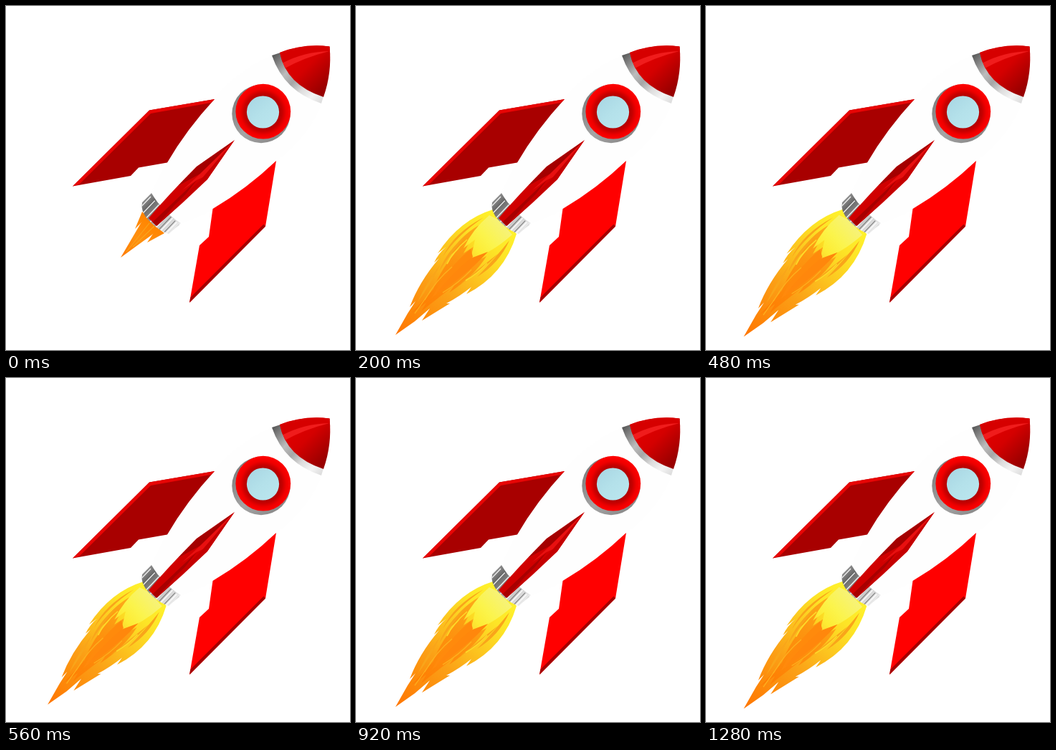
Write an HTML page with a canvas that moves like this. It is 480 px wide and 480 px high and loops after 1320 ms.

```html
<!DOCTYPE html>
<html lang="en">
<head>
<meta charset="utf-8">
<title>Rocket</title>
<style>
html, body { margin: 0; width: 100%; height: 100%; overflow: hidden; background: #fff; }
canvas { display: block; width: 480px; height: 480px; }
</style>
</head>
<body>
<canvas id="stage" width="480" height="480"></canvas>
<script>
const ctx = document.getElementById('stage').getContext('2d');
const LOOP = 1320, STEP = 40;
const HOLD_START = 14, HOLD_END = 16;
const FLICKER = [1.016, 1, 0.98, 1];
const PIVOT = [207, 300];

function fill(path, paint) {
  ctx.fillStyle = paint;
  ctx.fill(new Path2D(path));
}

function stroke(path, paint, width) {
  ctx.strokeStyle = paint;
  ctx.lineWidth = width;
  ctx.stroke(new Path2D(path));
}

function disc(x, y, r, paint) {
  ctx.fillStyle = paint;
  ctx.beginPath();
  ctx.arc(x, y, r, 0, Math.PI * 2);
  ctx.fill();
}

function addStops(gradient, stops) {
  stops.forEach(([at, color]) => gradient.addColorStop(at, color));
  return gradient;
}

const linear = (x0, y0, x1, y1, ...stops) =>
  addStops(ctx.createLinearGradient(x0, y0, x1, y1), stops);
const radial = (x, y, r0, r1, ...stops) =>
  addStops(ctx.createRadialGradient(x, y, r0, x, y, r1), stops);

function clipped(path, draw) {
  ctx.save();
  ctx.clip(new Path2D(path));
  draw();
  ctx.restore();
}

function drawSideFins() {
  fill('M291 130L200 145.5L93 251.5L174 237L185 225.5L225 218.5Q252 172 291 130Z', '#a80000');
  fill('M93 251.5L200 145.5L291 130L286 135L202 150L102 249Z', '#e80404');

  const right = 'M377 216L362 307.5L256 414L270 334L283 322L288.5 283Q336 255 377 216Z';
  fill(right, '#ff0000');
  clipped(right, () => stroke('M362 307L256 413', '#a40000', 7));
}

function drawBody() {
  fill('M371 69Q325 88 290 130Q237 185 203 261L244 304Q323 276 377 217Q425 178 441 134Z', '#fefefe');
}

function drawNose() {
  fill('M371 69L383 65Q395 108 443 126L440 136Q388 119 371 69Z',
    linear(373, 67, 440, 133, [0, '#555'], [.15, '#858585'], [.33, '#bcbcbc'],
      [.5, '#a5a5a5'], [.68, '#ddd'], [.85, '#f4f4f4'], [1, '#dedede']));
  const nose = 'M382 65Q415 52 451.5 56.5Q455 93 443 127Q391 110 382 65Z';
  fill(nose, linear(394, 66, 444, 116, [0, '#e40000'], [.45, '#d40000'], [1, '#980000']));
  clipped(nose, () => {
    fill('M381 65Q415 52 452 56L452 63Q415 66 385 80Z', '#d60000');
    fill('M385 80Q415 64 451 63Q416 72 389 87Z', '#f01c1c');
  });
}

function drawWindow() {
  disc(356, 150.5, 40.7, linear(325, 125, 385, 182, [0, '#808080'], [.5, '#a5a5a5'], [1, '#888']));
  disc(358.8, 147.2, 38.4, radial(359, 148, 22, 39,
    [0, '#b00000'], [.25, '#c40000'], [.6, '#f00000'], [1, '#ff0000']));
  disc(358.5, 148, 22.6, linear(344, 132, 372, 165, [0, '#abd9e5'], [.5, '#b4e1ea'], [1, '#b9e5ed']));
}

function drawNozzle() {
  const nozzle = 'M203 261L190 274Q187 286 199 299Q212 313 227 318L244 303Q218 287 203 261Z';
  fill(nozzle, linear(194, 268, 238, 311,
    [0, '#949494'], [.18, '#686868'], [.4, '#8c8c8c'], [.65, '#c8c8c8'], [1, '#eee']));
  clipped(nozzle, () => {
    for (let i = 0; i < 8; i++) {
      const x = 202 + i * 5.7, y = 266 + i * 5.6;
      stroke(`M${x} ${y}L${x - 20} ${y + 21}`, i < 4 ? '#f4f4f4' : '#858585', 1.3);
      if (i > 3) stroke(`M${x + 2} ${y + 2}L${x - 18} ${y + 23}`, '#fafafa', 1.6);
    }
  });
}

function drawCenterFin() {
  const fin = 'M319 187L266 224Q227 263 199 296L210 307Q246 276 281 242Z';
  fill(fin, '#d00000');
  clipped(fin, () => {
    fill('M319 187L266 224L240 251L271 234Z', '#a40000');
    fill('M319 187L271 234L246 257L266 243L281 236Z', '#e81010');
    fill('M266 243L204 302L211 307L232 287Z', '#a80000');
    fill('M319 187L281 242L210 307L236 277L272 242Z', '#c40000');
  });
}

function drawIgnition() {
  const glow = linear(205, 303, 162, 350, [0, '#ff8500'], [.5, '#ff9010'], [1, '#ff7a00']);
  fill('M194 293L160 351L215 311Z', glow);
  fill('M190 287L180 311L197 294Z', glow);
  fill('M211 309L197 330L221 317Z', glow);
  stroke('M200 303L168 343M207 307L177 336', '#f9a51c', 1.2);
}

function drawFlame(scale) {
  ctx.save();
  ctx.translate(...PIVOT);
  ctx.scale(scale, scale);
  ctx.translate(-PIVOT[0], -PIVOT[1]);
  const flame = 'M191 284Q145 298 114 345L126 336Q115 345 109 358L116 352' +
    'Q88 385 75 420L83 412L72 429L55 459L82 440L103 422L92 439L131 415L126 415' +
    'Q145 405 161 392L154 402Q207 375 224 318Z';
  fill(flame, linear(207, 300, 55, 459,
    [0, '#fff22c'], [.18, '#fde426'], [.38, '#fcc51f'], [.6, '#fba016'], [1, '#ff7500']));
  clipped(flame, () => {
    const ember = linear(190, 318, 70, 440, [0, '#fdae1a'], [.35, '#fd9510'], [1, '#ff7800']);
    fill('M171 306Q143 323 132 347L145 337Q120 363 107 397L119 383L78 428' +
      'L98 414L91 426L137 390L130 400Q165 377 182 349L169 356Q190 340 197 325' +
      'Q177 336 159 354L164 336L150 345Z', ember);
    fill('M186 292Q163 311 150 338L166 326L160 354Q190 344 218 319L200 299Z',
      linear(207, 303, 153, 350, [0, '#f6f27c'], [.45, '#fbf44c'], [.75, '#fdec34'], [1, '#fbd32a']));

    const streaks = [
      'M178 295Q136 317 121 350Q141 320 178 295Z',
      'M157 316Q126 342 116 370Q133 345 157 316Z',
      'M214 327Q200 359 169 378Q195 351 214 327Z',
      'M199 345Q174 372 145 388Q175 364 199 345Z',
      'M118 360Q98 386 86 413Q104 389 118 360Z'
    ];
    streaks.forEach(path => fill(path, '#f9a51a'));
    fill('M160 339Q126 367 106 407Q137 384 163 350Z', '#ff8a0c');
    fill('M184 343Q150 380 112 401Q135 372 160 352Z', '#ff870c');
    stroke('M134 364Q112 382 96 410M161 368Q144 386 121 400M104 398L82 429',
      '#fdb21f', 1.2);
    stroke('M155 326Q135 343 127 360M183 359Q169 374 153 383', '#fddb2a', 1.5);
  });
  ctx.restore();
}

function render(time) {
  const tick = Math.floor((time % LOOP) / STEP);
  const pose = tick > HOLD_START && tick <= HOLD_END ? HOLD_START : tick;
  ctx.fillStyle = '#fff';
  ctx.fillRect(0, 0, 480, 480);
  if (pose === 0) drawIgnition();
  else drawFlame(FLICKER[pose % FLICKER.length]);
  drawBody();
  drawSideFins();
  drawNozzle();
  drawCenterFin();
  drawNose();
  drawWindow();
}

function loop() {
  render(performance.now());
  requestAnimationFrame(loop);
}
loop();
</script>
</body>
</html>
```
